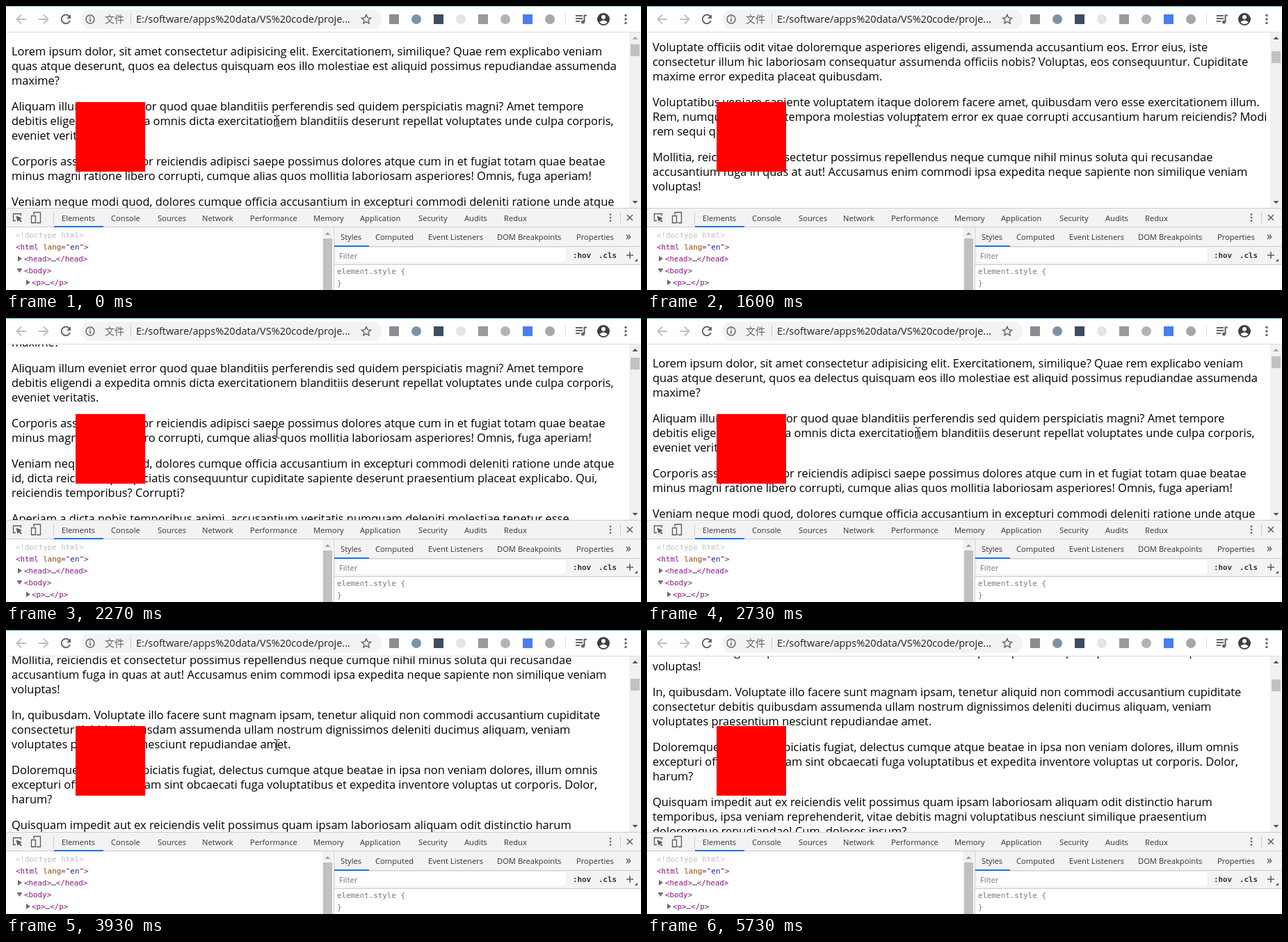
Animation, 913 px wide and 408 px high, one loop 5870 ms. Source, as an HTML page:

```html
<!DOCTYPE html>
<html lang="en">
<head>
<meta charset="utf-8">
<style>
  html, body { margin: 0; width: 100%; height: 100%; overflow: hidden; background: #fff; }
  svg { display: block; width: 913px; height: 408px; }
  text { font-family: "Open Sans", "Noto Sans CJK SC", "Noto Sans CJK", sans-serif; }
  #content text { font-size: 16.45px; }
  .ui { font-size: 11.2px; }
  .code { font: 10.85px "DejaVu Sans Mono", monospace; }
  .tag { fill: #881280; }
  .line { fill: none; stroke-width: 2; }
</style>
</head>
<body>
<svg viewBox="0 0 913 408" xmlns="http://www.w3.org/2000/svg">
  <defs><clipPath id="view"><rect y="38" width="896" height="252"/></clipPath></defs>

  <g clip-path="url(#view)"><g id="content"></g></g>
  <rect x="100" y="138" width="100" height="100" fill="#f00"/>
  <g id="tip">
    <path d="M8 49h7l6-7 6 7h78q3 0 3 3v18q0 3-3 3h-97q-3 0-3-3v-18q0-3 3-3z" fill="#fff" stroke="#ccc"/>
    <text class="ui" x="14" y="65"><tspan class="tag">p</tspan><tspan x="49" fill="#555">880 × 63</tspan></text>
  </g>

  <!-- page scrollbar -->
  <rect x="896" y="38" width="17" height="252" fill="#f1f1f1"/>
  <path id="up" d="M900.5 48l4-4 4 4z"/>
  <path d="M900.5 280l4 4 4-4z" fill="#505050"/>
  <rect id="thumb" x="898" width="13" height="17" fill="#c1c1c1"/>

  <!-- browser toolbar -->
  <rect width="913" height="37" fill="#fff"/>
  <rect y="37" width="913" height="1" fill="#dadce0"/>
  <rect id="edge" width="913" height="1"/>
  <g class="line" stroke="#bdc1c6">
    <path d="M29 19H16M22 12.500l-6.500 6.500 6.500 6.500M47 19h13M54 12.500l6.500 6.500-6.500 6.500"/>
    <path d="M91 15a6.300 6.300 0 1 0 1 6" stroke="#5f6368"/>
  </g>
  <path d="M93 12v6h-6z" fill="#5f6368"/>
  <rect x="108" y="5" width="432" height="28" rx="14" fill="#f1f3f4"/>
  <circle cx="121" cy="19" r="6" fill="none" stroke="#5f6368" stroke-width="1.500"/>
  <path d="M120.200 15h1.600v1.600h-1.600zM120.200 18h1.600v4.500h-1.600z" fill="#5f6368"/>
  <text x="142" y="24" font-size="14" fill="#5f6368">文件</text>
  <path d="M179.500 11v16" stroke="#c4c7ca"/>
  <text x="187" y="24" font-size="14.500" fill="#202124">E:/software/apps%20data/VS%20code/proje...</text>
  <path d="M518 12.500l1.900 4.400 4.700.4-3.600 3.100 1.100 4.600-4.100-2.400-4.100 2.400 1.100-4.600-3.600-3.100 4.700-.4z" fill="none" stroke="#5f6368" stroke-width="1.400"/>
  <g id="badges"></g>
  <path d="M804.500 11v16" stroke="#dadce0"/>
  <path class="line" d="M819 14h10M819 18h10M819 22h6M831.500 23v-9.500h3.500" stroke="#5f6368"/>
  <circle cx="829.500" cy="23" r="2.500" fill="#5f6368"/>
  <circle cx="859" cy="19" r="9" fill="#3c4043"/>
  <circle cx="859" cy="16" r="3" fill="#fff"/>
  <path d="M853 23.500q6-6 12 0-6 5-12 0z" fill="#fff"/>
  <g fill="#5f6368"><circle cx="891" cy="13.500" r="1.700"/><circle cx="891" cy="19" r="1.700"/><circle cx="891" cy="24.500" r="1.700"/></g>

  <!-- developer tools -->
  <rect y="290" width="913" height="118" fill="#fff"/>
  <rect y="290" width="913" height="28" fill="#f3f3f3"/>
  <path d="M0 290.500h913M0 317.500h913M68.500 296v16M883.500 296v16" stroke="#ccc"/>
  <g fill="none" stroke="#5a5a5a" stroke-width="1.300">
    <path d="M14 308.500h-3.500v-10h11v3"/>
    <path d="M40 300v-3.500h9.500v15H44M36.500 301.500h6v10h-6z"/>
    <path d="M893 300l8 8M901 300l-8 8" stroke-width="1.500"/>
  </g>
  <path d="M14.500 301.500l8.500 3.500-3.300 1.300 3 3.200-1.500 1.300-3-3.200-1.400 3z" fill="#5a5a5a"/>
  <g fill="#5a5a5a"><circle cx="869" cy="299.500" r="1.300"/><circle cx="869" cy="304" r="1.300"/><circle cx="869" cy="308.500" r="1.300"/></g>
  <rect x="69" y="316" width="71" height="2" fill="#1a73e8"/>

  <rect id="hover" x="3" y="389" width="448" height="17" rx="5" fill="#ebf2fb"/>
  <g class="code">
    <text class="code" x="14" y="333" fill="#c0c0c0">&lt;!doctype html&gt;</text>
    <text class="code tag" x="14" y="350">&lt;html <tspan fill="#994500">lang</tspan>="<tspan fill="#1a1aa6">en</tspan>"&gt;</text>
    <text class="code tag" x="26" y="367">&lt;head&gt;<tspan fill="#333">…</tspan>&lt;/head&gt;</text>
    <text class="code tag" x="26" y="384">&lt;body&gt;</text>
    <text class="code tag" x="37" y="401">&lt;p&gt;<tspan fill="#333">…</tspan>&lt;/p&gt;</text>
  </g>
  <path d="M17 359l6 4-6 4zM15.500 377h8l-4 6zM29 393l6 4-6 4z" fill="#6e6e6e"/>
  <rect x="455" y="318" width="15" height="90" fill="#f1f1f1"/>
  <path d="M458.500 329l4-4 4 4z" fill="#a3a3a3"/>
  <rect x="456" y="334" width="13" height="74" fill="#c1c1c1"/>

  <rect x="472" y="318" width="441" height="54" fill="#f3f3f3"/>
  <path d="M471.500 318v90M472 345.500h441M472 371.500h441" stroke="#ccc"/>
  <rect x="472" y="344" width="50" height="2" fill="#1a73e8"/>
  <rect x="475" y="348" width="330" height="20" fill="#fff"/>
  <text class="ui" x="479" y="363" fill="#757575">Filter</text>
  <g fill="#333" font-weight="bold">
    <text class="code" x="815" y="362" style="font-weight:bold">:hov</text>
    <text class="code" x="852" y="362" style="font-weight:bold">.cls</text>
  </g>
  <path d="M892 358h10M897 353v10" stroke="#5a5a5a" stroke-width="1.500"/>
  <path d="M908 363v4h-4z" fill="#5a5a5a"/>
  <g fill="#777"><text class="code" x="476" y="385">element.style {</text><text class="code" x="476" y="402">}</text></g>
  <g id="tabs" fill="#333"></g>

  <g id="beam" fill="none">
    <path d="M385.500 157.500h3l1 1 1-1h3M389.500 158v14M385.500 172.500h3l1-1 1 1h3" stroke="#000"/>
  </g>
  <path id="arrow" d="M0 0v16l4-3.500 2.500 6 2.500-1-2.500-6h5z" fill="#fff" stroke="#000"/>
</svg>
<script>
const LOOP = 5870, FRAME = 200 / 3;
const $ = id => document.getElementById(id);

const paragraphs = `Lorem ipsum dolor, sit amet consectetur adipisicing elit. Exercitationem, similique? Quae rem explicabo veniam
quas atque deserunt, quos ea delectus quisquam eos illo molestiae est aliquid possimus repudiandae assumenda
maxime?

Aliquam illum eveniet error quod quae blanditiis perferendis sed quidem perspiciatis magni? Amet tempore
debitis eligendi a expedita omnis dicta exercitationem blanditiis deserunt repellat voluptates unde culpa corporis,
eveniet veritatis.

Corporis assumenda dolor reiciendis adipisci saepe possimus dolores atque cum in et fugiat totam quae beatae
minus magni ratione libero corrupti, cumque alias quos mollitia laboriosam asperiores! Omnis, fuga aperiam!

Veniam neque modi quod, dolores cumque officia accusantium in excepturi commodi deleniti ratione unde atque
id, dicta reiciendis perspiciatis consequuntur cupiditate sapiente deserunt praesentium placeat explicabo. Qui,
reiciendis temporibus? Corrupti?

Aperiam a dicta nobis temporibus animi, accusantium veritatis numquam deleniti molestiae tenetur esse
doloremque consequatur adipisci quod laborum sequi dolor repellat iure voluptatibus fuga vero nulla placeat non.
Voluptate, rerum.

Voluptate officiis odit vitae doloremque asperiores eligendi, assumenda accusantium eos. Error eius, iste
consectetur illum hic laboriosam consequatur assumenda officiis nobis? Voluptas, eos consequuntur. Cupiditate
maxime error expedita placeat quibusdam.

Voluptatibus veniam sapiente voluptatem itaque dolorem facere amet, quibusdam vero esse exercitationem illum.
Rem, numquam minima tempora molestias voluptatem error ex quae corrupti accusantium harum reiciendis? Modi
rem sequi quas.

Mollitia, reiciendis et consectetur possimus repellendus neque cumque nihil minus soluta qui recusandae
accusantium fuga in quas at aut! Accusamus enim commodi ipsa expedita neque sapiente non similique veniam
voluptas!

In, quibusdam. Voluptate illo facere sunt magnam ipsam, tenetur aliquid non commodi accusantium cupiditate
consectetur debitis quibusdam assumenda ullam nostrum dignissimos deleniti ducimus aliquam, veniam
voluptates praesentium nesciunt repudiandae amet.

Doloremque dolore perspiciatis fugiat, delectus cumque atque beatae in ipsa non veniam dolores, illum omnis
excepturi officiis laboriosam sint obcaecati fuga voluptatibus et expedita inventore voluptas ut corporis. Dolor,
harum?

Quisquam impedit aut ex reiciendis velit possimus quam ipsam laboriosam aliquam odit distinctio harum
temporibus, ipsa veniam reprehenderit, vitae debitis magni voluptatibus nesciunt similique praesentium
doloremque repudiandae! Cum, dolores ipsum?`;

let baseline = 71;
$('content').innerHTML = paragraphs.split('\n').map(line => {
  const markup = `<text x="8" y="${baseline}">${line}</text>`;
  baseline += line ? 21 : 16;
  return markup;
}).join('');

const label = (y, entries) => Object.entries(entries)
  .map(([name, x]) => `<text class="ui" x="${x}" y="${y}">${name}</text>`).join('');
$('tabs').innerHTML =
  label(308.5, { Elements: 80, Console: 151, Sources: 218, Network: 282, Performance: 351,
    Memory: 442, Application: 509, Security: 593, Audits: 659, Redux: 716 }) +
  label(335.5, { Styles: 481, Computed: 531, 'Event Listeners': 607, 'DOM Breakpoints': 706, Properties: 820 }) +
  '<text x="891" y="336" font-size="16">»</text>';

$('badges').innerHTML = ['#8a8d91', '#7d93a5', '#3f4e60', '#e4e4e4', '#9a9a9a', '#b4b4b4', '#4a7df0', '#a5a8ab']
  .map((color, i) => i % 2
    ? `<circle cx="${558 + 32 * i}" cy="19" r="7" fill="${color}"/>`
    : `<rect x="${551 + 32 * i}" y="12" width="14" height="14" fill="${color}"/>`).join('');

// [tick, value...] points, joined by straight lines
const scrollPath = [[0, 0], [13, 0], [14, 208], [18, 208], [24, 380], [27, 400], [28, 400], [34, 72], [36, 12],
  [38, 12], [41, 0], [46, 0], [50, 170], [53, 290], [55, 290], [59, 554], [60, 571], [62, 583], [64, 587]];
const pointerPath = [[63, 389, 165], [64, 396, 274], [66, 412, 330], [69, 436, 399]];

function along(path, tick) {
  const i = path.findIndex(point => point[0] >= tick);
  if (i < 0) return path.at(-1).slice(1);
  if (i === 0) return path[0].slice(1);
  const [a, b] = [path[i - 1], path[i]];
  const k = (tick - a[0]) / (b[0] - a[0]);
  return a.slice(1).map((v, j) => v + (b[j + 1] - v) * k);
}

function tickAt(t) {
  const tick = Math.floor((t + 5) / FRAME);
  return Math.round(tick * FRAME / 10) * 10 > t ? tick - 1 : tick;
}

const show = (id, on) => $(id).setAttribute('visibility', on ? 'visible' : 'hidden');

function draw(now) {
  const tick = tickAt(now % LOOP);
  const scroll = Math.round(along(scrollPath, tick)[0]);
  const [x, y] = along(pointerPath, tick);

  $('content').setAttribute('transform', `translate(0 ${-scroll})`);
  $('thumb').setAttribute('y', 55 + Math.round(scroll * 0.0273));
  $('up').setAttribute('fill', scroll ? '#505050' : '#a3a3a3');
  $('edge').setAttribute('fill', tick < 1 ? '#7fcfcb' : tick < 86 ? '#3fbab5' : '#5fc5c0');

  $('beam').setAttribute('transform', `translate(${x - 389} ${y - 165})`);
  $('arrow').setAttribute('transform', `translate(${x} ${y})`);
  show('beam', tick < 65);
  show('arrow', tick >= 65 && tick < 70);
  show('hover', tick >= 68 && tick < 70);
  show('tip', tick >= 68 && tick < 76);
  requestAnimationFrame(draw);
}
draw(performance.now());
</script>
</body>
</html>
```
